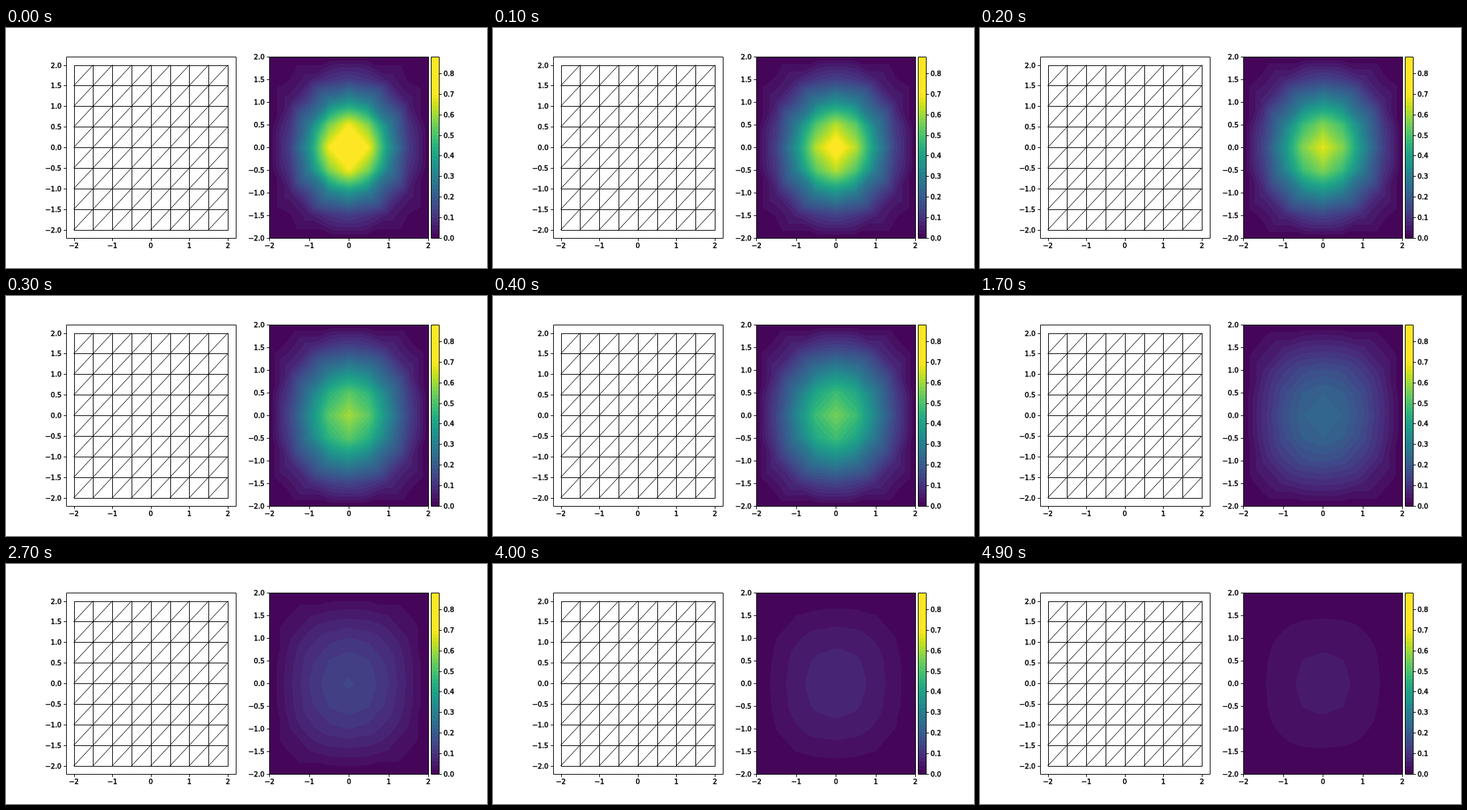
An HTML page with a canvas for the animation above (5 s loop, 720 by 360 pixels).

```html
<!DOCTYPE html>
<html lang="en">
<head>
<meta charset="utf-8">
<title>Heat diffusion</title>
<style>
  html, body { margin: 0; width: 100%; height: 100%; overflow: hidden; background: #fff; }
  canvas, svg { position: absolute; left: 0; top: 0; width: 720px; height: 360px; }
  text { font: 10px "DejaVu Sans", sans-serif; fill: #000; stroke: #000; stroke-width: .5px; }
  path { fill: none; stroke: #000; stroke-width: 1; }
  path.mesh { stroke-linecap: square; }
</style>
</head>
<body>
<canvas id="field" width="720" height="360"></canvas>
<svg id="axes" viewBox="0 0 720 360"></svg>
<script>
const N = 8, H = 4 / N, DT = 0.04, STEPS = 50, STEP_MS = 100;
const BAND = 0.02, V_MAX = 0.7, BAR_MAX = 0.88;
const TOP = 43.2, BOTTOM = 315;
const MESH = { x0: 90, x1: 343.6, lim: 2.2 };
const HEAT = { x0: 394.4, x1: 632.3, lim: 2 };
const BAR = { x0: 636.4, x1: 648 };

const VIRIDIS = ('440154 471365 482475 463480 414487 3b528b 355f8d 2f6c8e 2a788e 25848e 21918c ' +
  '1e9c89 22a884 2fb47c 44bf70 5ec962 7ad151 9bd93c bddf26 dfe318 fde725')
  .split(' ').map(h => [0, 2, 4].map(i => parseInt(h.slice(i, i + 2), 16)));

function viridis(v) {
  const p = Math.min(1, Math.max(0, v)) * (VIRIDIS.length - 1);
  const i = Math.min(VIRIDIS.length - 2, Math.floor(p));
  return VIRIDIS[i].map((c, k) => Math.round(c + (VIRIDIS[i + 1][k] - c) * (p - i)));
}

const bands = Array.from({ length: Math.round(BAR_MAX / BAND) },
  (_, i) => viridis((i + 0.5) * BAND / V_MAX));

// Linear finite elements, implicit Euler, zero on the boundary.
const W = N + 1;
const AXIAL = [1, -1, W, -W], DIAGONAL = [W + 1, -W - 1];
const sum = (u, k, offsets) => offsets.reduce((s, o) => s + u[k + o], 0);

const inner = [];
for (let j = 1; j < N; j++) for (let i = 1; i < N; i++) inner.push(j * W + i);

function advance(u) {
  const r = DT / (H * H), m = 1 / 12;
  const rhs = inner.map(k => u[k] / 2 + m * (sum(u, k, AXIAL) + sum(u, k, DIAGONAL)));
  const next = new Float64Array(W * W);
  for (let sweep = 0; sweep < 40; sweep++) {
    inner.forEach((k, n) => {
      const rest = (m - r) * sum(next, k, AXIAL) + m * sum(next, k, DIAGONAL);
      next[k] = (rhs[n] - rest) / (0.5 + 4 * r);
    });
  }
  return next;
}

const fields = [];
let u = Float64Array.from({ length: W * W }, (_, k) => {
  const x = -2 + (k % W) * H, y = -2 + Math.floor(k / W) * H;
  return Math.exp(-x * x - y * y);
});
for (let s = 0; s < STEPS; s++) fields.push(u = advance(u));

// Contours use triangles whose diagonals alternate from cell to cell.
function sample(f, gx, gy) {
  const i = Math.min(N - 1, Math.floor(gx)), j = Math.min(N - 1, Math.floor(gy));
  const fx = gx - i, fy = gy - j, k = j * W + i;
  const a = f[k], b = f[k + 1], c = f[k + W + 1], d = f[k + W];
  if ((i + j) % 2) {
    return fx >= fy ? a + (b - a) * fx + (c - b) * fy : a + (d - a) * fy + (c - d) * fx;
  }
  return fx + fy <= 1 ? a + (b - a) * fx + (d - a) * fy
    : c + (d - c) * (1 - fx) + (b - c) * (1 - fy);
}

const ctx = document.getElementById('field').getContext('2d');
const left = Math.floor(HEAT.x0), top0 = Math.floor(TOP);
const image = ctx.createImageData(Math.ceil(HEAT.x1) - left, Math.ceil(BOTTOM) - top0);
const toGrid = v => Math.min(N, Math.max(0, v * N));

function paint(f) {
  const { width, height, data } = image;
  let p = 0;
  for (let j = 0; j < height; j++) {
    const gy = toGrid((BOTTOM - top0 - j - 0.5) / (BOTTOM - TOP));
    for (let i = 0; i < width; i++) {
      const gx = toGrid((left + i + 0.5 - HEAT.x0) / (HEAT.x1 - HEAT.x0));
      const b = Math.min(bands.length - 1, Math.max(0, Math.floor(sample(f, gx, gy) / BAND)));
      const c = bands[b];
      data[p++] = c[0]; data[p++] = c[1]; data[p++] = c[2]; data[p++] = 255;
    }
  }
  ctx.putImageData(image, left, top0);
}

const barY = v => BOTTOM - (BOTTOM - TOP) * v / BAR_MAX;
function paintBar() {
  bands.forEach((c, i) => {
    const y0 = Math.round(barY((i + 1) * BAND)), y1 = Math.round(barY(i * BAND));
    ctx.fillStyle = `rgb(${c})`;
    ctx.fillRect(636, y0, 12, y1 - y0);
  });
}

// Axes
const svg = document.getElementById('axes');
const snap = v => Math.floor(v + 0.5) + 0.5;
const xOf = (ax, v) => ax.x0 + (ax.x1 - ax.x0) * (v + ax.lim) / (2 * ax.lim);
const yOf = (ax, v) => BOTTOM - (BOTTOM - TOP) * (v + ax.lim) / (2 * ax.lim);
const format = (v, digits) => v.toFixed(digits).replace('-', '\u2212');

function add(name, attrs, content = '') {
  const el = document.createElementNS('http://www.w3.org/2000/svg', name);
  for (const k in attrs) el.setAttribute(k, attrs[k]);
  el.textContent = content;
  svg.append(el);
}
const line = (d, cls = '') => add('path', { d, class: cls });
const label = (x, y, anchor, str) => add('text', { x, y, 'text-anchor': anchor }, str);

function box(ax) {
  line(`M${snap(ax.x0)} ${snap(TOP)}H${snap(ax.x1)}V${snap(BOTTOM)}H${snap(ax.x0)}Z`);
}

function plotAxes(ax) {
  box(ax);
  for (let v = -2; v <= 2; v++) {
    const x = xOf(ax, v);
    line(`M${snap(x)} ${snap(BOTTOM)}v4`);
    label(x, 330, 'middle', format(v, 0));
  }
  for (let v = -2; v <= 2; v += 0.5) {
    const y = yOf(ax, v);
    line(`M${snap(ax.x0)} ${snap(y)}h-4`);
    label(Math.round(ax.x0 - 7), Math.round(y) + 4, 'end', format(v, 1));
  }
}

// Straight grid lines sit on whole pixels, diagonals keep their exact place.
function plotMesh() {
  const X = i => xOf(MESH, -2 + i * H), Y = j => yOf(MESH, -2 + j * H);
  let d = '';
  for (let i = 0; i <= N; i++) {
    d += `M${snap(X(i))} ${snap(Y(0))}V${snap(Y(N))}M${snap(X(0))} ${snap(Y(i))}H${snap(X(N))}`;
  }
  for (let s = 1 - N; s < N; s++) {
    const i0 = Math.max(0, s), j0 = Math.max(0, -s), n = N - Math.abs(s);
    d += `M${X(i0)} ${Y(j0)}L${X(i0 + n)} ${Y(j0 + n)}`;
  }
  line(d, 'mesh');
}

plotMesh();
plotAxes(MESH);
plotAxes(HEAT);
box(BAR);
for (let i = 0; i <= 8; i++) {
  const y = barY(i / 10);
  line(`M${snap(BAR.x1)} ${snap(y)}h4`);
  label(BAR.x1 + 7, Math.round(y) + 4, 'start', format(i / 10, 1));
}
paintBar();

const start = performance.now();
let shown = -1;
function tick() {
  const step = Math.floor((performance.now() - start) / STEP_MS) % STEPS;
  if (step !== shown) paint(fields[shown = step]);
  requestAnimationFrame(tick);
}
tick();
</script>
</body>
</html>
```
